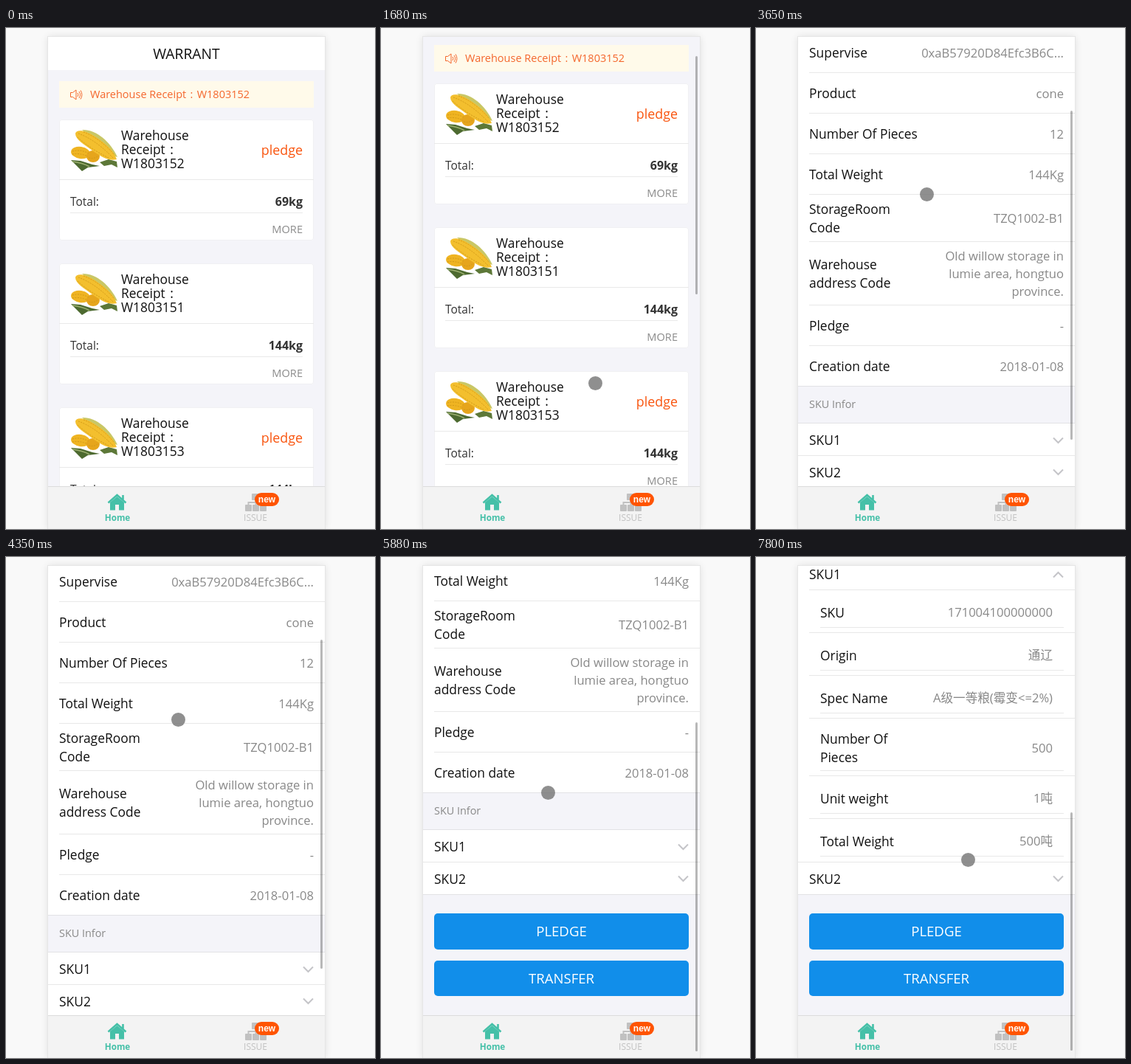
Animation, 500 px wide and 679 px high, one loop 8 s. Source, as an HTML page:

```html
<!DOCTYPE html>
<html lang="en">
<head>
<meta charset="utf-8">
<title>Warrant</title>
<style>
@property --s { syntax: '<number>'; inherits: true; initial-value: 0 }
@property --k { syntax: '<number>'; inherits: true; initial-value: .487 }

* { box-sizing: border-box }
html, body { margin: 0; width: 100%; height: 100%; overflow: hidden; background: #f9f9f9 }
body { position: relative; color: #111; font: 17.4px/25px "Open Sans", "Noto Sans CJK SC", sans-serif }

#phone {
  position: absolute; left: 57px; top: 12px; width: 375px; height: 667px;
  background: #f4f4f9; box-shadow: 0 0 0 1px #e6e6e6, 0 0 10px rgba(0,0,0,.12);
  animation: scroll 8s steps(4) infinite;
}
#view { position: absolute; inset: 0; overflow: hidden }
.page {
  position: absolute; left: 0; top: 0; width: 375px;
  transform: translateY(calc(var(--s) * -1px));
}
#list { animation: leave 8s step-end infinite }
#detail { animation: enter 8s step-end infinite }
header { height: 45px; background: #fff; text-align: center; font-size: 19.3px; line-height: 46px }

.notice {
  height: 36px; margin: 15px 15px 16px; padding-left: 42px; position: relative;
  background: #fffaea; color: #f4662c; font-size: 14.5px; line-height: 35px;
}
.notice svg { position: absolute; left: 15px; top: 11px }
.colon { display: inline-block; width: 1em; text-align: center }

.card {
  position: relative; height: 164px; margin: 0 15px 31px; border-radius: 4px;
  background: #fff; box-shadow: inset 0 0 0 1px #f0f0f3; line-height: 24px;
}
.card > * { position: absolute }
.card svg { left: 15px; top: 13px }
.card .name { left: 84px; top: 12px; font-size: 17.4px; line-height: 19px }
.card .state { right: 15px; top: 29px; font-size: 17.9px; color: #f9550f }
.card .total { left: 15px; top: 99px; font-size: 15.5px; color: #333 }
.card b { right: 15px; top: 99px; font-size: 16px; color: #333 }
.card .more { right: 15px; top: 136px; font-size: 14.6px; color: #8c8c8c }
.card i { height: 1px; background: #e9e9e9; left: 0; right: 0; top: 81px }
.card i + i { left: 15px; right: 15px; top: 126px }

.label { height: 39px; padding-left: 15px; font-size: 14.4px; line-height: 39px; color: #888 }
.label.sku { height: 51px; line-height: 47px; border: solid #e2e2e5; border-width: 1px 0 }
.cells { background: #fff }
.row {
  display: flex; align-items: center; justify-content: space-between;
  height: 55px; margin-left: 15px; padding: 1px 15px 0 0; border-top: 1px solid #e8e8e8;
}
.row:first-child { border-color: transparent }
.row span { color: #888; font-size: 16.6px; line-height: 24px; text-align: right }
.row.head { height: 43px; margin: 0; padding-left: 15px }
.row.head + .panel + .row.head { height: 44px }
.panel { height: 0; overflow: hidden; animation: expand 8s step-end infinite }
.panel .row { position: relative; height: 58px; padding: 3px 30px 0 15px; border-color: #e8e8e8 }
.panel .row::after {
  content: ""; position: absolute; left: 15px; right: 15px; bottom: 6px; height: 1px; background: #e8e8e8;
}
.chevron { fill: none; stroke: #c4c4c8; stroke-width: 2 }
.flip { animation: flip 8s step-end infinite }
.end { height: 26px; border-top: 1px solid #e2e2e5 }
.button {
  height: 49px; margin: 0 15px 15px; border-radius: 5px; background: #118eea;
  color: #fff; font-size: 18.6px; line-height: 48px; text-align: center;
}
.button + .button { height: 48px; line-height: 47px }

nav {
  position: absolute; left: 0; right: 0; top: 609px; bottom: 0;
  background: #f3f3f3; border-top: 1px solid #dcdcdc;
}
nav svg { position: absolute; left: 0; top: -1px }
#thumb {
  position: absolute; left: 369px; width: 3px; border-radius: 2px; background: rgba(0,0,0,.28);
  top: calc(2px + var(--s) * var(--k) * 1px); height: calc(var(--k) * 664px);
  animation: fade 8s steps(3) infinite;
}
#touch {
  position: absolute; left: -9.5px; top: -9.5px; width: 19px; height: 19px; border-radius: 50%;
  background: rgba(115,115,115,.8); animation: touch 8s steps(4) infinite;
}

@keyframes scroll {
  0% { --s: 0; --k: .487 }
  6% { --s: 0; animation-timing-function: steps(6) }
  11.75% { --s: 174; animation-timing-function: step-end }
  12.75% { --s: 190 }
  15.625% { --s: 190; animation-timing-function: steps(6) }
  21% { --s: 49; animation-timing-function: step-end }
  22.25% { --s: 0 }
  34.74% { --k: .487; animation-timing-function: step-end }
  34.75% { --k: .672 }
  41.625% { --s: 0 }
  45.625% { --s: 146 }
  54.125% { --s: 146; animation-timing-function: steps(6) }
  60% { --s: 247 }
  69.5% { --s: 247 }
  73.5% { --s: 312 }
  88.74% { --k: .672; animation-timing-function: step-end }
  88.75% { --k: .487 }
  93.5% { --s: 312 }
  97.5%, 100% { --s: 681; --k: .487 }
}
@keyframes fade {
  0%, 25.25%, 49.375%, 67.625%, 80.125% { opacity: 0; animation-timing-function: step-end }
  6%, 23.375%, 41.625%, 47.5%, 54.125%, 64.75%, 70.5%, 77.25%, 93.5%, 100% { opacity: 1 }
}
@keyframes touch {
  0% { opacity: 0; transform: translate(275px,414px); animation-timing-function: step-end }
  4.75% { opacity: 1; transform: translate(275px,414px) }
  6% { transform: translate(275px,414px); animation-timing-function: steps(6) }
  11.75% { transform: translate(261px,235px); animation-timing-function: step-end }
  12.75% { transform: translate(258px,219px); animation-timing-function: steps(3) }
  15.625% { transform: translate(280px,335px); animation-timing-function: steps(6) }
  21% { transform: translate(290px,481px); animation-timing-function: step-end }
  22.25% { transform: translate(290px,530px); animation-timing-function: steps(3) }
  25.25%, 28.125% { transform: translate(293px,420px) }
  32%, 39.625% { transform: translate(258px,326px); animation-timing-function: steps(2) }
  41.625% { transform: translate(250px,376px) }
  45.625%, 53.125% { transform: translate(231px,225px); animation-timing-function: step-end }
  54.125% { transform: translate(233px,220px); animation-timing-function: steps(6) }
  60%, 61.625% { transform: translate(245px,118px); animation-timing-function: step-end }
  62.875%, 63.75% { transform: translate(250px,190px) }
  67.625%, 69.5% { transform: translate(242px,384px) }
  73.5%, 77.25% { transform: translate(226px,319px); animation-timing-function: steps(3) }
  80.125%, 82.25% { transform: translate(404px,401px); animation-timing-function: steps(3) }
  84.875%, 91.625% { transform: translate(411px,401px); animation-timing-function: steps(2) }
  93.5% { transform: translate(320px,560px) }
  97.5%, 100% { opacity: 1; transform: translate(287px,410px) }
}
@keyframes leave { 0% { opacity: 1 } 34.75%, 100% { opacity: 0 } }
@keyframes enter { 0% { opacity: 0 } 34.75%, 100% { opacity: 1 } }
@keyframes expand { 0% { height: 0 } 88.75%, 100% { height: 369px } }
@keyframes flip { 0% { transform: none } 88.75%, 100% { transform: scaleY(-1) } }
</style>
</head>
<body>
<svg width="0" height="0" style="position:absolute">
  <symbol id="corn" viewBox="0 0 64 58">
    <path d="M1 42L14 43 30 48 40 50 24 52 16 57 9 50Z" fill="#4d6a30"/>
    <path d="M40 45L52 41 63 44 64 52 56 48 46 50Z" fill="#5d7838"/>
    <path d="M3 44Q18 46 26 51" fill="none" stroke="#9db070" stroke-width="1.5"/>
    <path d="M16 1C34 0 54 16 64 38L58 36Z" fill="#c9c766"/>
    <ellipse cx="14" cy="32" rx="13" ry="8" transform="rotate(8 14 32)" fill="#efb422"/>
    <ellipse cx="31" cy="37" rx="9" ry="8" fill="#e6a51c"/>
    <path d="M7 6C8 0 20 1 32 9S58 26 63 41C54 44 42 38 30 29S7 14 7 6Z" fill="#f3bf2e"/>
    <g fill="none" stroke="#d39a18" stroke-dasharray="2 1.5">
      <path d="M11 6Q34 14 58 39M10 11Q26 26 52 39M18 4Q40 12 60 35"/>
      <path d="M3 30Q14 27 25 33M3 34Q13 32 24 37M25 39Q33 41 38 36"/>
    </g>
  </symbol>
</svg>

<div id="phone">
  <div id="view">
    <div id="list" class="page">
      <header>WARRANT</header>
      <div class="notice">
        <svg width="17" height="15" fill="none" stroke="#f4662c"><path d="M.5 4.5h3l4.5-3.5v13L3.5 10.5h-3zM10 5q1.8 2.5 0 5M12 3q3.2 4.5 0 9M14 1.5q3.800 6 0 12"/></svg>
        Warehouse Receipt<span class="colon">:</span>W1803152
      </div>
    </div>
    <div id="detail" class="page">
      <header>DETAIL</header>
      <div class="label">Warrant Infor</div>
      <div class="cells" id="info"></div>
      <div class="label sku">SKU Infor</div>
      <div class="cells">
        <div class="row head">SKU1<svg class="chevron flip" width="15" height="10"><path d="M1 1.5L7.5 8 14 1.5"/></svg></div>
        <div class="panel" id="sku"></div>
        <div class="row head">SKU2<svg class="chevron" width="15" height="10"><path d="M1 1.5L7.5 8 14 1.5"/></svg></div>
      </div>
      <div class="end"></div>
      <div class="button">PLEDGE</div>
      <div class="button">TRANSFER</div>
    </div>
  </div>
  <nav>
    <svg width="375" height="58" text-anchor="middle" font-family="Open Sans, sans-serif">
      <g fill="#45c0a8">
        <path d="M93.5 14L84 22v10.5h7V25h5v7.5h7V22Z"/>
        <path d="M81.5 22.5L93.5 12l12 10.500M101.5 12v6" fill="none" stroke="#45c0a8" stroke-width="2.6"/>
        <text x="94" y="47" font-size="11.7" font-weight="700">Home</text>
      </g>
      <g fill="#c1c1c1">
        <rect x="276" y="10" width="11" height="9" rx="1"/>
        <rect x="267" y="25" width="9" height="9" rx="1"/>
        <rect x="277" y="25" width="9" height="9" rx="1"/>
        <rect x="287" y="25" width="9" height="9" rx="1"/>
        <path d="M271.5 26v-4h20v4M281.5 18v8" fill="none" stroke="#c1c1c1" stroke-width="2"/>
        <text x="281" y="47" font-size="12">ISSUE</text>
      </g>
      <rect x="280" y="9" width="33" height="18" rx="9" fill="#ff5400"/>
      <text x="296.5" y="22" font-size="12" font-weight="700" fill="#fff" font-family="Liberation Sans, Arial, sans-serif">new</text>
    </svg>
  </nav>
  <div id="thumb"></div>
</div>
<div id="touch"></div>

<script>
const card = ([code, total, state]) => `<div class="card">
  <svg width="64" height="58"><use href="#corn"/></svg>
  <div class="name">Warehouse<br>Receipt<span class="colon">:</span><br>${code}</div>
  <div class="state">${state}</div><i></i><i></i>
  <div class="total">Total:</div><b>${total}kg</b>
  <div class="more">MORE</div></div>`;

const row = ([name, value, height]) =>
  `<div class="row"${height ? ` style="height:${height}px"` : ''}><div>${name}</div><span>${value}</span></div>`;

const fill = (id, items, make) =>
  document.getElementById(id).insertAdjacentHTML('beforeend', items.map(make).join(''));

fill('list', [
  ['W1803152', 69, 'pledge'],
  ['W1803151', 144, ''],
  ['W1803153', 144, 'pledge'],
  ['W1803152', 69, '']
], card);

fill('info', [
  ['Receipt', 'W1803151'],
  ['Supervise', '0xaB57920D84Efc3B6C...'],
  ['Product', 'cone'],
  ['Number Of Pieces', '12'],
  ['Total Weight', '144Kg'],
  ['StorageRoom<br>Code', 'TZQ1002-B1', 64],
  ['Warehouse<br>address Code', 'Old willow storage in<br>lumie area, hongtuo<br>province.', 86],
  ['Pledge', '-'],
  ['Creation date', '2018-01-08']
], row);

fill('sku', [
  ['SKU', '171004100000000'],
  ['Origin', '通辽'],
  ['Spec Name', 'A级一等粮(霉变&lt;=2%)'],
  ['Number Of<br>Pieces', '500', 78],
  ['Unit weight', '1吨'],
  ['Total Weight', '500吨']
], row);
</script>
</body>
</html>
```
